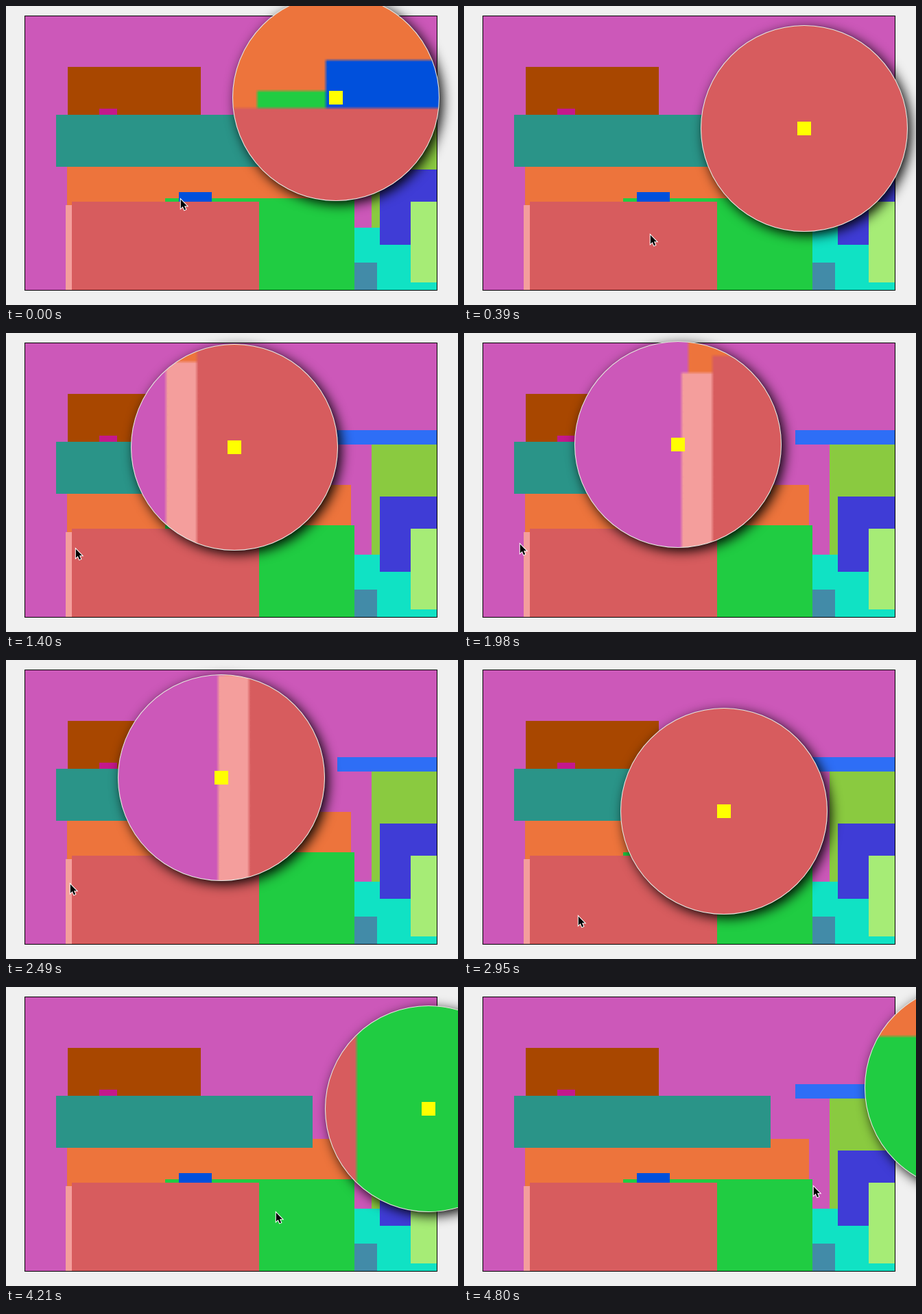
Write an HTML page with a canvas that moves like this. It is 659 by 437 pixels and loops after 4.9 s.

```html
<!DOCTYPE html>
<html>
<head>
<meta charset="utf-8">
<style>
  html, body { margin: 0; width: 100%; height: 100%; overflow: hidden; background: #f0f0f0; }
  canvas { display: block; }
</style>
</head>
<body>
<canvas id="stage" width="659" height="437"></canvas>
<script>
const WIDTH = 659, HEIGHT = 437;
const BOARD = { left: 28, top: 15, right: 628, bottom: 415 };
const LOOP = 4900, STEP = 57.83, LAST = 83;
const ZOOM = 5, RADIUS = 150.5, LENS_DX = 226, LENS_DY = -149;
const ctx = document.getElementById('stage').getContext('2d');

// key points of the mouse path: step, x, y
const PATH = [
  [1, 255, 283], [10, 278, 348], [14, 293, 363], [15, 299, 364], [19, 189, 337],
  [24, 107, 316], [25, 102, 316], [29, 80, 328], [34, 86, 312], [35, 82, 309],
  [39, 70, 299], [48, 121, 355], [51, 153, 370], [55, 215, 385], [59, 306, 343],
  [64, 368, 299], [65, 365, 294], [78, 418, 338], [83, 509, 296], [84, 510, 292]
];

function slope(i, axis) {
  const a = PATH[Math.max(i - 1, 0)], b = PATH[Math.min(i + 1, PATH.length - 1)];
  return (b[axis] - a[axis]) / (b[0] - a[0]);
}

// cubic Hermite interpolation between key points
function mouseAt(step) {
  const n = Math.max(step, PATH[0][0]);
  let i = 0;
  while (i < PATH.length - 2 && PATH[i + 1][0] <= n) i++;
  const a = PATH[i], b = PATH[i + 1], span = b[0] - a[0], u = (n - a[0]) / span;
  const w = u * u * (3 - 2 * u);
  return [1, 2].map(axis => Math.round(
    a[axis] + (b[axis] - a[axis]) * w +
    span * u * (1 - u) * ((1 - u) * slope(i, axis) - u * slope(i + 1, axis))
  ));
}

function buildScene() {
  const canvas = document.createElement('canvas');
  canvas.width = WIDTH;
  canvas.height = HEIGHT;
  const g = canvas.getContext('2d');
  const { left, top, right, bottom } = BOARD;

  // a block without a size runs to the board's right or bottom edge
  function block(color, x, y, w = right - x, h = bottom - y) {
    g.fillStyle = color;
    g.fillRect(x, y, w, h);
  }

  block('#f0f0f0', 0, 0, WIDTH, HEIGHT);
  block('#000', left - 1, top - 1, right - left + 2, bottom - top + 2);
  block('#cc58b9', left, top);
  block('#8aca40', 533, 163);
  block('#2e6ef6', 483, 142, undefined, 21);
  block('#10e2c4', 508, 324);
  block('#428ba8', 508, 375, 33);
  block('#3f3cd6', 545, 239, undefined, 110);
  block('#a6ec76', 590, 286, undefined, 118);
  block('#a84700', 90, 89, 194, 70);
  block('#c4188c', 136, 150, 26, 9);
  block('#ed743c', 89, 222, 414);
  block('#2a9488', 73, 159, 374, 76);
  block('#20cc42', 232, 281, 276);
  block('#0050dc', 252, 272, 48, 14);
  block('#f49e9c', 87, 291, 9);
  block('#d75c5e', 96, 286, 273);
  return canvas;
}

const scene = buildScene();
const arrow = new Path2D('M0 0V13L3 10.2L5.2 15.4L7.4 14.5L5.2 9.4H9.2Z');

function drawCursor(x, y) {
  ctx.save();
  ctx.translate(x + 0.8, y + 1.8);
  ctx.lineWidth = 2;
  ctx.strokeStyle = '#fff';
  ctx.stroke(arrow);
  ctx.fillStyle = '#000';
  ctx.fill(arrow);
  ctx.restore();
}

function drawLens(sx, sy) {
  const x = sx + LENS_DX, y = sy + LENS_DY;
  const rim = new Path2D();
  rim.arc(x, y, RADIUS, 0, Math.PI * 2);

  ctx.save();
  ctx.shadowColor = '#000';
  ctx.shadowBlur = 18;
  ctx.shadowOffsetX = ctx.shadowOffsetY = 5;
  ctx.fill(rim);
  ctx.restore();

  ctx.save();
  ctx.clip(rim);
  const reach = Math.ceil(RADIUS / ZOOM), size = 2 * reach;
  ctx.drawImage(scene, sx - reach, sy - reach, size, size,
    x - reach * ZOOM, y - reach * ZOOM, size * ZOOM, size * ZOOM);
  ctx.restore();

  ctx.fillStyle = '#ff0';
  ctx.fillRect(x - 10, y - 10, 20, 20);
  ctx.lineWidth = 1.1;
  ctx.strokeStyle = '#e4e4e4';
  ctx.stroke(rim);
}

function render() {
  const time = performance.now() % LOOP;
  const n = Math.min(LAST, Math.floor((time + 18) / STEP));
  ctx.drawImage(scene, 0, 0);
  // the pointer runs one step ahead of the lens
  const [px, py] = mouseAt(n + 1);
  drawCursor(px - 1, py - 2);
  drawLens(...mouseAt(n));
  requestAnimationFrame(render);
}
render();
</script>
</body>
</html>
```
